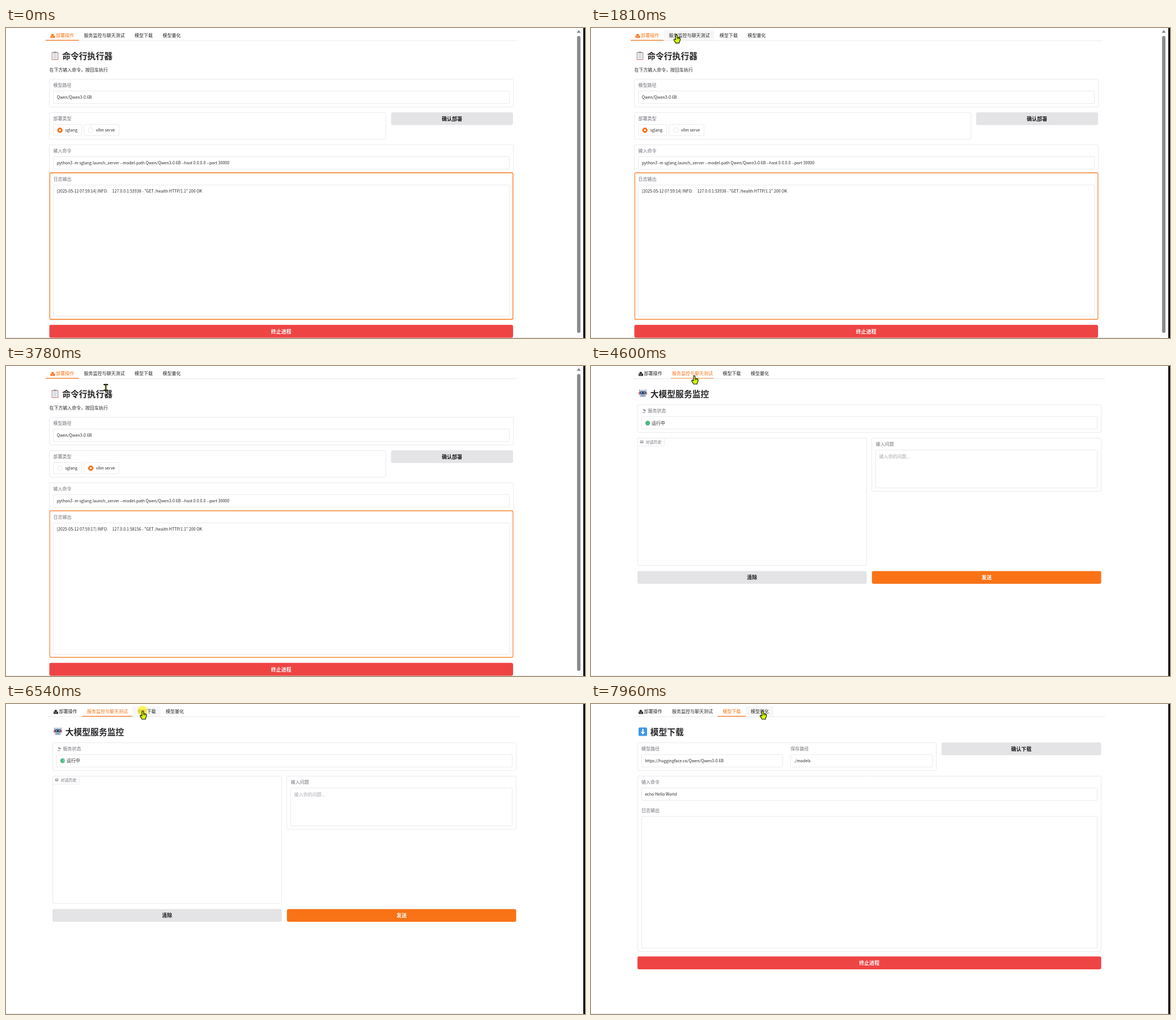
Animation of 1022 by 548 pixels, one loop 8 s. Source, as an HTML page with a canvas:

```html
<!DOCTYPE html>
<html lang="zh-CN">
<head>
<meta charset="utf-8">
<title>部署面板</title>
<style>
html, body { margin: 0; width: 100%; height: 100%; overflow: hidden; background: #fff; }
canvas { display: block; }
</style>
</head>
<body>
<canvas id="stage" width="1022" height="548"></canvas>
<script>
const ctx = document.getElementById('stage').getContext('2d');
const LOOP = 8000;
const FONT = '"Noto Sans CJK SC", "Noto Sans CJK", "Open Sans", sans-serif';
const INK = '#27272a', GREY = '#71717a', LINE = '#ebebee', SILVER = '#e4e4e7';
const ORANGE = '#f97316', RED = '#ef4444', LIME = '#d3f80a', DARK = '#14150a';

// Events in ms
const LOG_AT = 2340, RADIO_AT = 3270, CHAT_AT = 4480, STATUS_AT = 4870, DOWNLOAD_AT = 6860;
const CLICKS = [RADIO_AT - 190, CHAT_AT - 250, DOWNLOAD_AT - 320];
const CLICK_MS = 220;

// Layout: the column moves right once the scrollbar is gone
const WIDE = 818.5, PAD = 7, LABEL_H = 21.5, INPUT_H = 22, GAP = 9.2;
let left = 76.5;

const clamp = v => Math.max(0, Math.min(1, v));
const ease = u => u * u * (3 - 2 * u);
const within = (p, x, y, w, h) => p.x >= x && p.x <= x + w && p.y >= y && p.y <= y + h;

// Laid out ten times larger so that glyph advances stay fractional.
function text(s, x, y, { size = 8, color = INK, weight = 400, align = 'left' } = {}) {
  ctx.save();
  ctx.translate(x, y + size * 0.38);
  ctx.scale(0.1, 0.1);
  ctx.font = `${weight} ${size * 10}px ${FONT}`;
  ctx.textAlign = align;
  ctx.fillStyle = color;
  ctx.fillText(s, 0, 0);
  ctx.restore();
}

const label = (s, x, y) => text(s, x, y, { color: GREY });
const value = (s, x, y) => text(s, x, y, { size: 7.07 });
const heading = s => text(s, left + 22.7, 49, { size: 14.8, weight: 700 });

function rect(x, y, w, h, color) {
  ctx.fillStyle = color;
  ctx.fillRect(x, y, w, h);
}

function round(x, y, w, h, r, fill) {
  ctx.beginPath();
  ctx.roundRect(x, y, w, h, r);
  ctx.fillStyle = fill;
  ctx.fill();
}

function disc(x, y, r, fill, from = 0, to = Math.PI * 2) {
  ctx.beginPath();
  ctx.moveTo(x, y);
  ctx.arc(x, y, r, from, to);
  ctx.fillStyle = fill;
  ctx.fill();
}

function poly(points, fill) {
  ctx.beginPath();
  points.forEach(([x, y]) => ctx.lineTo(x, y));
  ctx.closePath();
  ctx.fillStyle = fill;
  ctx.fill();
}

// Hairline frame, snapped to whole pixels.
function box(x, y, w, h, r = 2.5) {
  const x0 = Math.floor(x) + 0.5, y0 = Math.floor(y) + 0.5;
  ctx.beginPath();
  ctx.roundRect(x0, y0, Math.floor(x + w) + 0.5 - x0, Math.floor(y + h) + 0.5 - y0, r);
  ctx.strokeStyle = LINE;
  ctx.lineWidth = 1;
  ctx.stroke();
}

function button(s, x, y, w, fill, color = '#fff') {
  const h = 22.6;
  round(x, y, w, h, 3, fill);
  text(s, x + w / 2, y + h / 2, { size: 9, weight: 700, color, align: 'center' });
}

// Label above an input; x, y is the corner of the surrounding panel.
function field(s, x, y, w, content = '', h = INPUT_H) {
  label(s, x + PAD, y + 11);
  box(x + PAD, y + LABEL_H, w - 2 * PAD, h, 1.5);
  value(content, x + PAD + 6.2, y + LABEL_H + 11);
}

function panelField(s, x, y, w, content, h = INPUT_H) {
  box(x, y, w, LABEL_H + h + 6);
  field(s, x, y, w, content, h);
}

function tabs(page, t, p) {
  const since = t - [-LOOP, CHAT_AT, DOWNLOAD_AT][page];
  let x = left - 6.5;
  rect(x, 22, 832, 1, LINE);
  ['部署操作', '服务监控与聊天测试', '模型下载', '模型量化'].forEach((name, i) => {
    const icon = i ? 0 : 9, w = name.length * 8 + 17.5 + icon;
    const on = i === page, color = on ? ORANGE : INK;
    if (!on && p && within(p, x, 2, w, 20)) rect(x, 4, w, 18, '#f7f7f8');
    if (icon) {
      rect(x + 8.5, 13.5, 8, 4, color);
      rect(x + 10.3, 10.5, 4, 3, color);
      rect(x + 9.5, 15, 5, 0.8, '#ffffffa0');
    }
    text(name, x + 9.1 + icon, 13, { color });
    if (on) {
      const grow = 1 - (1 - clamp(since / 200)) ** 2;
      ctx.globalAlpha = 0.3 + 0.7 * grow ** 4;
      rect(x + w * (1 - grow) / 2, 21, w * grow, 1.2, ORANGE);
      ctx.globalAlpha = 1;
    }
    x += w;
  });
}

function clipboard(x, y) {
  round(x, y, 12, 14, 1.2, '#c79c8e');
  round(x + 1.3, y + 1.8, 9.4, 10.8, 0.5, '#eef3f9');
  round(x + 3.5, y - 0.8, 5, 2.6, 0.8, '#8d98a5');
  for (let i = 0; i < 4; i++) rect(x + 3, y + 3.6 + i * 2, 6, 0.7, '#a9bdd6');
}

function robot(x, y) {
  rect(x, y + 4, 15, 4.5, '#e2665d');
  round(x + 1.8, y, 11.4, 13, 2.5, '#b5c5d6');
  round(x + 2.2, y + 3, 10.6, 5, 2, '#303a55');
  for (const side of [-1, 1]) {
    disc(x + 7.5 + side * 2.5, y + 5.5, 1.3, '#7cc9f5');
    rect(x + 7 + side * 6, y - 0.5, 1, 4, '#8795a5');
  }
  rect(x + 4.5, y + 10, 6, 1, '#5f6c80');
}

function downArrow(x, y) {
  round(x, y, 15, 15, 2, '#3d97e8');
  rect(x + 6.4, y + 2.5, 2.2, 7, '#fff');
  poly([[x + 3.5, y + 8], [x + 11.5, y + 8], [x + 7.5, y + 12.5]], '#fff');
}

function radio(s, x, w, on) {
  const y = 180.7;
  box(x, y - 10, w, 19.6);
  disc(x + 11.7, y, 4.7, on ? ORANGE : '#dedee2');
  disc(x + 11.7, y, on ? 1.8 : 4, '#fff');
  value(s, x + 20.9, y);
}

function scrollbar() {
  rect(1006, 0, 11, 548, '#fcfcfc');
  poly([[1011, 3.5], [1014.5, 8.5], [1007.5, 8.5]], '#858585');
  round(1008, 14, 6, 525, 3, '#8b8b8b');
}

function deployPage(t) {
  const side = 594, vllm = t >= RADIO_AT;
  clipboard(left + 4, 42.5);
  heading('命令行执行器');
  text('在下方输入命令，按回车执行', left, 74, { size: 7.95 });
  panelField('模型路径', left, 90, WIDE, 'Qwen/Qwen3-0.6B');

  box(left, 149.3, side, 47);
  label('部署类型', left + PAD, 160.3);
  radio('sglang', left + PAD, 49.5, !vllm);
  radio('vllm serve', left + 61.3, 62, vllm);
  button('确认部署', left + side + GAP, 149, WIDE - side - GAP, SILVER, '#18181b');

  panelField('输入命令', left, 206, WIDE,
    'python3 -m sglang.launch_server --model-path Qwen/Qwen3-0.6B --host 0.0.0.0 --port 30000');
  logPanel(t);
  button('终止进程', left, 524.8, WIDE, RED);
  scrollbar();
}

function logPanel(t) {
  const y = 255.7, h = 259.6;
  const [sec, port] = t < LOG_AT ? [14, 53938] : [17, 58156];
  rect(left + 0.5, y, WIDE - 1, h, '#fff');
  field('日志输出', left, y, WIDE,
    `[2025-05-12 07:59:${sec}] INFO:     127.0.0.1:${port} - "GET /health HTTP/1.1" 200 OK`, h - 27.5);
  ctx.beginPath();
  ctx.roundRect(left + 0.8, y + 0.3, WIDE - 1, h - 0.6, 2);
  ctx.globalAlpha = 0.74 + 0.26 * Math.cos((t - 170) / 1000 * Math.PI);
  ctx.strokeStyle = ORANGE;
  ctx.lineWidth = 1.3;
  ctx.stroke();
  ctx.globalAlpha = 1;
}

function chatPage(t) {
  const half = (WIDE - GAP) / 2, right = left + half + GAP;
  const lit = t >= STATUS_AT, y = lit ? 100.2 : 101;
  robot(left + 2, 42);
  heading('大模型服务监控');

  panelField('', left, 68, WIDE);
  disc(left + 13, 77, 3, '#9a9aa2', 0.6, 3.6);
  rect(left + 9, 82, 5, 0.9, '#8a8a92');
  label('服务状态', left + 18.6, 79);
  disc(left + 18, y, 4.2, '#52b788');
  if (lit) disc(left + 18, y, 4.2, '#74cfa2', -1.2, 0.9);
  text('运行中', left + 25, y);

  box(left, 127, half, 225.5);
  box(left, 127, 47, 14.5, 2);
  round(left + 4.5, 131.8, 6, 4.8, 1, '#a2a2aa');
  rect(left + 5.5, 133, 4, 1, '#fff');
  text('对话历史', left + 14.6, 134.3, { size: 7, color: GREY });

  panelField('输入问题', right, 127, half, '', 66.5);
  text('输入你的问题...', right + 13, 160, { color: '#a8a8b0' });
  button('清除', left, 362.4, half, SILVER, '#18181b');
  button('发送', right, 362.4, half, ORANGE);
}

function downloadPage() {
  const side = 527.5;
  downArrow(left + 2, 41.5);
  heading('模型下载');
  box(left, 68, side, 49.5);
  field('模型路径', left, 68, side / 2, 'https://huggingface.co/Qwen/Qwen3-0.6B');
  field('保存路径', left + side / 2 - 0.5, 68, side / 2, './models');
  button('确认下载', left + side + GAP, 67.9, WIDE - side - GAP, SILVER, '#18181b');

  box(left, 127, WIDE, 310);
  field('输入命令', left, 127, WIDE, 'echo Hello World');
  field('日志输出', left, 176.5, WIDE, '', 233);
  button('终止进程', left, 446.3, WIDE, RED);
}

// Cursor rests: time, x, y
const PATH = [
  [270, 1000, 533], [1150, 137, 36], [1450, 149, 12], [2340, 153, 11], [2900, 173, 181],
  [3350, 174, 181], [3700, 176, 38], [3990, 177, 37], [4200, 182, 13], [4600, 182, 17],
  [5350, 255, 14], [5880, 241, 12], [6900, 241, 12], [LOOP, 303, 12]
];

function cursorAt(t) {
  const i = PATH.findIndex(k => k[0] > t);
  if (i < 1) return null;
  const [t0, x0, y0] = PATH[i - 1], [t1, x1, y1] = PATH[i];
  const e = ease((t - t0) / (t1 - t0));
  return { x: x0 + (x1 - x0) * e, y: y0 + (y1 - y0) * e };
}

function cursorKind(p) {
  if (p.y < 22.5 || within(p, 84, 171, 116, 19)) return hand;
  const overTitle = within(p, 99, 36.7, 89, 24);
  const overInput = [111, 227].some(y => within(p, 84, y, 804, INPUT_H)) || within(p, 84, 277, 804, 232);
  return overTitle || overInput ? beam : arrow;
}

function arrow() {
  const shape = new Path2D('M0 .5V11.5L2.6 9 4.6 13 6.6 12 4.8 8.2 8.6 7.8Z');
  outline(shape);
}

function hand() {
  const shape = new Path2D('M-1 1Q.5-1 1.7 1L2 5Q6.5 5 7.2 7.5 7 11 5.4 13V15H-.8L-4.3 9.4Q-4 6.5-1 9Z');
  outline(shape);
  for (let i = 0; i < 3; i++) rect(1.6 + i * 1.7, 5, 0.7, 3, DARK);
}

function beam() {
  for (const y of [-6, 4]) rect(-4, y, 8, 2.2, DARK);
  rect(-1.3, -6, 2.6, 12, DARK);
  rect(-0.4, -5, 0.8, 10, '#a9bd10');
}

function outline(shape) {
  ctx.fillStyle = LIME;
  ctx.fill(shape);
  ctx.strokeStyle = DARK;
  ctx.lineWidth = 1.1;
  ctx.lineJoin = 'round';
  ctx.stroke(shape);
}

function drawCursor(t, p) {
  if (CLICKS.some(c => t >= c && t < c + CLICK_MS)) disc(p.x, p.y, 9, 'rgba(255,244,40,0.72)');
  ctx.save();
  ctx.translate(p.x, p.y);
  cursorKind(p)();
  ctx.restore();
}

function draw(t) {
  const page = t < CHAT_AT ? 0 : t < DOWNLOAD_AT ? 1 : 2;
  const p = cursorAt(t);
  left = page ? 82 : 76.5;
  rect(0, 0, 1022, 548, '#fff');
  rect(0, 547, 1018, 1, '#e6e6e8');
  tabs(page, t, p);
  [deployPage, chatPage, downloadPage][page](t);
  rect(1017, 0, 1, 548, '#e3e3e3');
  rect(1019, 0, 3, 548, '#000');
  if (p) drawCursor(t, p);
}

const start = performance.now();
function tick() {
  draw((performance.now() - start) % LOOP);
  requestAnimationFrame(tick);
}
tick();
</script>
</body>
</html>
```
